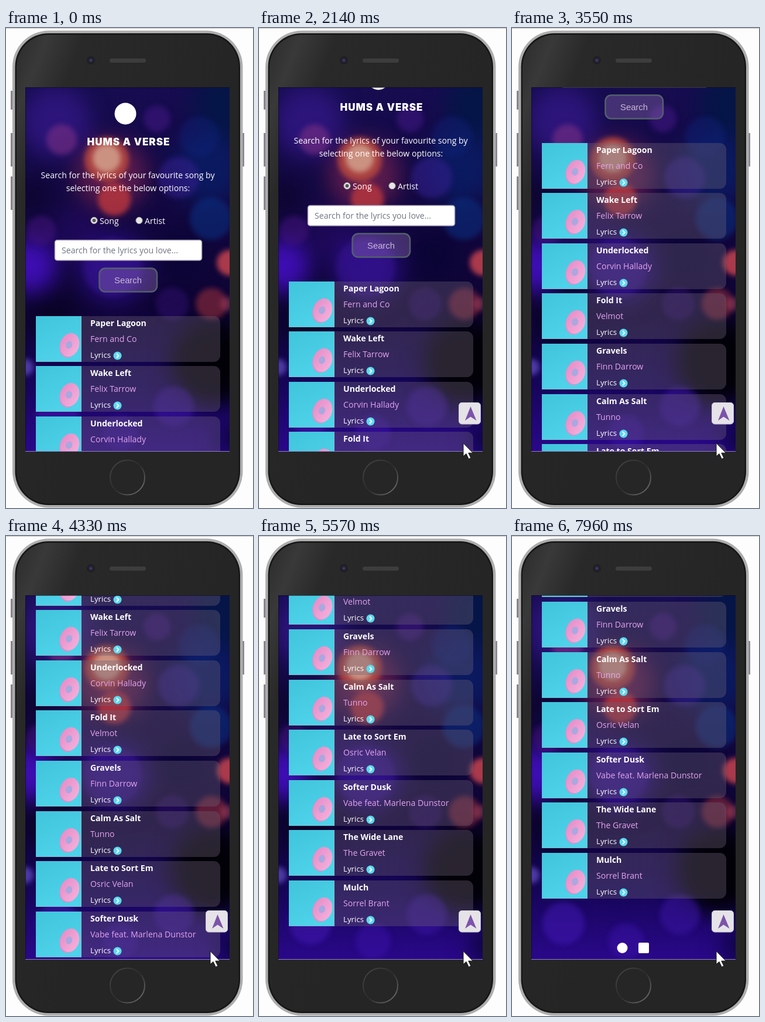
An HTML page for the animation above (8000 ms loop, 422 by 818 pixels).

```html
<!DOCTYPE html>
<html lang="en">
<head>
<meta charset="utf-8">
<title>Lyrics search</title>
<style>
  html, body { margin: 0; width: 100%; height: 100%; overflow: hidden; background: #fdfdfd; }
  svg { display: block; width: 422px; height: 818px; }
  text { font: 14.1px "Open Sans", "Noto Sans", sans-serif; fill: #fff; }
  .mid { text-anchor: middle; }
  .bold { font-weight: 700; }
  .artist { fill: #e3a4ec; }
  .link { font-size: 13.3px; }
  .hint { fill: #6f7480; }
  .brand { font: 900 17px Inter, sans-serif; letter-spacing: 1px; }
  .action { font: 14.8px "Liberation Sans", sans-serif; fill: #c9b9d6; }
  .credit { font: 700 17.5px Lato, sans-serif; fill: #2b2a3c; }
</style>
</head>
<body>
<svg viewBox="0 0 422 818">
  <defs>
    <clipPath id="screen"><rect x="33" y="101" width="349" height="620"/></clipPath>
    <linearGradient id="shell" x2=".6" y2=".5">
      <stop stop-color="#2b2b2b"/><stop offset=".14" stop-color="#393939"/>
      <stop offset=".3" stop-color="#292929"/><stop offset="1" stop-color="#252525"/>
    </linearGradient>
    <linearGradient id="night" x2="0" y2="1">
      <stop stop-color="#160c50"/><stop offset=".3" stop-color="#130842"/>
      <stop offset=".6" stop-color="#0e0434"/><stop offset=".82" stop-color="#16055a"/>
      <stop offset="1" stop-color="#2a088a"/>
    </linearGradient>
    <linearGradient id="cyan" x2=".5" y2="1">
      <stop stop-color="#40c4dc"/><stop offset="1" stop-color="#4ed3ea"/>
    </linearGradient>
    <linearGradient id="pink" x2="1" y2=".4">
      <stop stop-color="#e58cc8"/><stop offset="1" stop-color="#f3abd9"/>
    </linearGradient>
    <linearGradient id="home" y2="1">
      <stop stop-color="#484848"/><stop offset=".5" stop-color="#2c2c2c"/><stop offset="1" stop-color="#777"/>
    </linearGradient>
    <pattern id="mesh" width="3" height="3" patternUnits="userSpaceOnUse">
      <rect width="3" height="3" fill="#494949"/><path d="M0 0h1.5v1.5H0zM1.5 1.5H3V3H1.5z" fill="#303030"/>
    </pattern>
    <filter id="haze" x="-50%" y="-50%" width="200%" height="200%" color-interpolation-filters="sRGB">
      <feGaussianBlur stdDeviation="18"/>
    </filter>
    <filter id="soft" x="-30%" y="-30%" width="160%" height="160%" color-interpolation-filters="sRGB">
      <feGaussianBlur stdDeviation="4"/>
    </filter>
    <g id="card">
      <path d="M78 0H304a11 11 0 0 1 11 11V67a11 11 0 0 1-11 11H78z" fill="#6c6274" fill-opacity=".37"/>
      <rect width="78" height="78" fill="url(#cyan)"/>
      <path d="M0 77.5H77.5V0" fill="none" stroke="#8fb0bd" stroke-opacity=".7"/>
      <ellipse cx="56.500" cy="50" rx="15.500" ry="21" transform="rotate(18 56.500 50)" fill="#df8dca"/>
      <ellipse cx="58" cy="49" rx="16" ry="20.500" transform="rotate(18 58 49)" fill="url(#pink)"/>
      <ellipse cx="56.500" cy="49" rx="5.500" ry="6.500" transform="rotate(18 56.500 49)" fill="#a9a8df"/>
      <text class="link" x="93" y="71">Lyrics</text>
      <circle cx="139.500" cy="67.500" r="7" fill="#5bd9ef"/>
      <path d="M138 64l3.500 3.500-3.500 3.500" fill="none" stroke="#fff" stroke-width="2"/>
    </g>
  </defs>

  <rect width="422" height="818" fill="#fdfdfd"/>
  <rect width="422" height="1" fill="#c4c4c4"/>
  <path d="M8 107h4v32H8zM8 179h4v57H8zM8 253h4v57H8zM403 179h4v57h-4z" fill="#88848f"/>
  <rect x="11" y="4.500" width="393.500" height="813" rx="62" fill="#adadad"/>
  <rect x="15.500" y="9" width="384.500" height="804" rx="57" fill="#161616"/>
  <rect x="18" y="11.500" width="379.500" height="799" rx="55" fill="url(#shell)"/>
  <circle cx="145" cy="55" r="7" fill="#1f1f22"/>
  <circle cx="145" cy="55" r="4" fill="#28263f"/>
  <circle cx="145" cy="55" r="1.500" fill="#4a4688"/>
  <rect x="177" y="52" width="62" height="7" rx="3.500" fill="url(#mesh)"/>
  <circle cx="207.500" cy="766" r="29.500" fill="#262626" stroke="url(#home)" stroke-width="2"/>

  <g clip-path="url(#screen)">
    <rect x="33" y="101" width="349" height="620" fill="url(#night)"/>
    <g id="shades" filter="url(#haze)"></g>
    <g id="lights" filter="url(#soft)"></g>
    <g id="page">
      <circle cx="204" cy="146" r="18.500" fill="#fff"/>
      <text class="brand mid" x="209.500" y="200">HUMS A VERSE</text>
      <text class="mid" x="208" y="256">Search for the lyrics of your favourite song by</text>
      <text class="mid" x="208.500" y="278">selecting one the below options:</text>
      <circle cx="150.500" cy="328" r="5.700" fill="#e6e6e6" stroke="#8c8c8c"/>
      <circle cx="150.500" cy="328" r="3" fill="#555"/>
      <text x="160" y="333.500">Song</text>
      <circle cx="227.500" cy="328" r="5.700" fill="#e6e6e6" stroke="#8c8c8c"/>
      <text x="237" y="333.500">Artist</text>
      <rect x="83.500" y="361.500" width="251" height="34.500" rx="4" fill="#fff" stroke="#aaa0bb" stroke-width="1.500"/>
      <text class="hint" x="95" y="384">Search for the lyrics you love...</text>
      <rect x="159.500" y="409.500" width="98.500" height="40" rx="10" fill="#a884c4" fill-opacity=".32" stroke="#53606b" stroke-width="2.500"/>
      <text class="action mid" x="208.500" y="435">Search</text>
      <g id="cards"></g>
      <circle cx="188.500" cy="1423" r="9" fill="#fff"/>
      <rect x="216" y="1414" width="18" height="18" rx="2" fill="#fff"/>
      <text class="mid" x="208.500" y="1459">Lyrics powered by</text>
      <circle cx="159" cy="1494" r="14.500" fill="#f0465c"/>
      <text class="credit" x="178" y="1498">odeharvest</text>
    </g>
    <g id="top">
      <rect x="341.500" y="638.500" width="37" height="36.500" rx="5" fill="#e5e3e8" stroke="#c9c6cf"/>
      <path d="M361.500 645l10 24-10-6.500-9.500 6.500z" fill="#7c53a9"/>
    </g>
  </g>
  <path d="M33 721.500H382" stroke="#8d80bd"/>
  <path d="M33.500 721V101.500H382" fill="none" stroke="#0b0b14" stroke-opacity=".6"/>
  <circle id="ring" cx="348" cy="707" r="17" fill="none" stroke="#fff"/>
  <path id="cursor" d="M0 0V22.500L5 18 9.300 27 13 25.300 8.800 16.700H16.500z" fill="#fff" stroke="#111"/>
</svg>

<script>
const NS = 'http://www.w3.org/2000/svg';
const $ = id => document.getElementById(id);

function add(parent, tag, attrs, text = '') {
  const node = document.createElementNS(NS, tag);
  for (const key in attrs) node.setAttribute(key, attrs[key]);
  node.textContent = text;
  return parent.appendChild(node);
}

// x, y, radius, colour, opacity
const dot = parent => ([cx, cy, r, fill, opacity]) =>
  add(parent, 'circle', { cx, cy, r, fill, opacity });

[
  [85, 160, 60, '#35188a', .75], [380, 130, 60, '#041748', .9],
  [345, 240, 60, '#08226c', .7], [45, 285, 26, '#0a0428', .8],
  [180, 250, 60, '#7a2450', .7], [120, 350, 45, '#260a68', .6],
  [40, 405, 46, '#430fc0', .9], [185, 410, 60, '#3412a0', .6],
  [355, 570, 75, '#020108', 1], [80, 500, 40, '#080320', .8],
  [390, 700, 30, '#0a0438', .9], [300, 385, 40, '#080334', .7]
].forEach(dot($('shades')));

[
  [95, 190, 26, '#7a2f84', .6], [258, 155, 23, '#46198a', .5],
  [330, 185, 34, '#10247a', .4], [295, 255, 35, '#35208e', .55],
  [350, 325, 36, '#0a3284', .55], [60, 345, 25, '#461480', .5],
  [172, 224, 38, '#b8483f', .85], [172, 222, 24, '#d2a08c', .85],
  [185, 292, 28, '#b4363f', .85], [182, 408, 50, '#4a1bb0', .3],
  [284, 470, 28, '#3a1680', .4], [382, 400, 22, '#c6434f', .85],
  [351, 470, 27, '#8a2a3c', .65], [378, 470, 12, '#b04a60', .45],
  [33, 578, 14, '#6450c8', .7], [88, 660, 36, '#4a1cc0', .45],
  [287, 645, 34, '#3f16a8', .5], [195, 690, 30, '#4214b4', .4]
].forEach(dot($('lights')));

[
  ['Paper Lagoon', 'Fern and Co'], ['Wake Left', 'Felix Tarrow'],
  ['Underlocked', 'Corvin Hallady'], ['Fold It', 'Velmot'],
  ['Gravels', 'Finn Darrow'], ['Calm As Salt', 'Tunno'],
  ['Late to Sort Em', 'Osric Velan'], ['Softer Dusk', 'Vabe feat. Marlena Dunstor'],
  ['The Wide Lane', 'The Gravet'], ['Mulch', 'Sorrel Brant']
].forEach(([song, artist], i) => {
  const y = Math.floor(491 + i * 85.6);
  const card = add($('cards'), 'g', { transform: `translate(51 ${y})` });
  add(card, 'use', { href: '#card' });
  add(card, 'text', { x: 93, y: 17, class: 'bold' }, song);
  add(card, 'text', { x: 93, y: 44, class: 'artist' }, artist);
});

const LOOP = 8000;

// Bursts of updates: first, last, count
const ticks = [
  [210, 670, 7], [1830, 1910, 2], [2060, 2840, 11], [3010, 3070, 2],
  [3240, 4020, 11], [4100, 4860, 11], [4940, 5400, 7], [5570, 6190, 9],
  [7190, 7350, 3], [7500, 7650, 3], [7960, 7960, 1]
].flatMap(([from, to, n]) =>
  Array.from({ length: n }, (_, i) => from + (to - from) * i / Math.max(1, n - 1)));

const scrollKeys = [
  [0, 0], [1790, 0], [2684, 151], [4328, 450], [5570, 674], [6190, 806],
  [7110, 806], [7350, 770], [7650, 733], [7960, 721], [LOOP, 721]
];

function scrollAt(time) {
  const i = scrollKeys.findIndex(([at]) => at > time);
  const [t0, y0] = scrollKeys[i - 1], [t1, y1] = scrollKeys[i];
  return y0 + (y1 - y0) * (time - t0) / (t1 - t0);
}

const show = (id, visible) => $(id).setAttribute('visibility', visible ? 'visible' : 'hidden');
const move = (id, x, y) => $(id).setAttribute('transform', `translate(${x} ${y})`);

function draw(time) {
  const tick = ticks.reduce((last, at) => at <= time ? at : last, 0);
  const scroll = Math.round(scrollAt(tick));
  const left = 1 - Math.min(1, Math.max(0, (tick - 210) / 460));
  move('page', 0, -scroll);
  move('cursor', 349 + 3 * left, 707.5 + 100 * left * left);
  show('cursor', tick >= 210);
  show('ring', time >= 900 && time < 1070);
  show('top', scroll > 50);
}

const start = performance.now();
function loop() {
  draw((performance.now() - start) % LOOP);
  requestAnimationFrame(loop);
}
loop();
</script>
</body>
</html>
```
